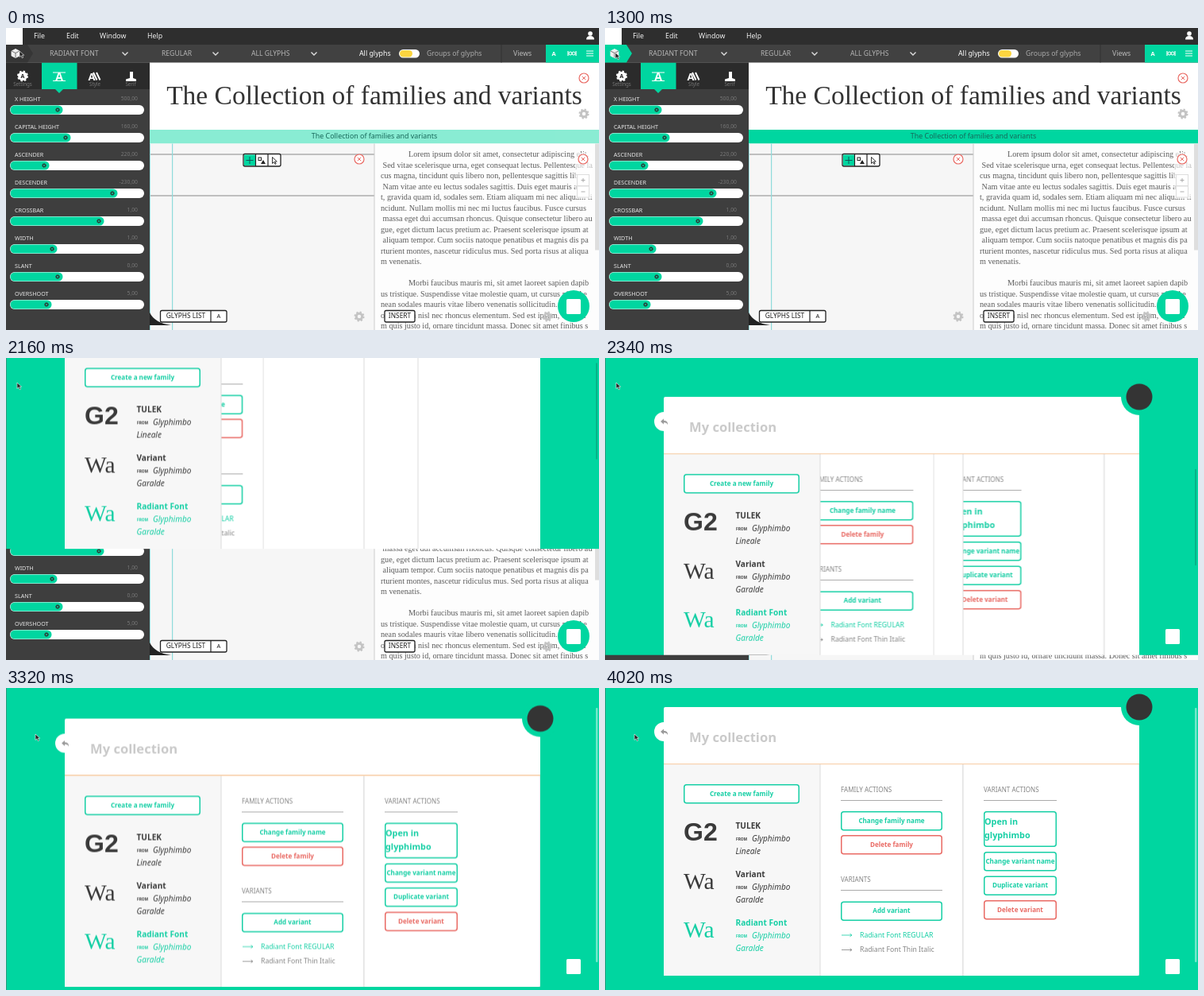
An HTML page for the animation above (4.06 s loop, 747 px wide and 380 px high).

```html
<!DOCTYPE html>
<html lang="en">
<head>
<meta charset="utf-8">
<title>Font editor collection</title>
<style>
html, body { margin: 0; width: 100%; height: 100%; overflow: hidden; background: #fff; }
svg { display: block; width: 747px; height: 380px; font-family: "Noto Sans", "Open Sans", sans-serif; }
text { white-space: pre; }
.serif { font-family: "Liberation Serif", "Noto Serif", serif; }
.grotesk { font-family: "Liberation Sans", sans-serif; }
.hover, .band, .caret, .overlay, .slide2, .slide3, .scroll, .pill, .thumb, .rest, .cursor {
  animation: 4060ms linear infinite;
}
.hover { animation-name: hover; }
.band { animation-name: band; }
.caret { animation-name: caret; }
.overlay { animation-name: drop; }
.slide2 { --from: -185px; animation-name: slide; }
.slide3 { --from: -225px; animation-name: slide; }
.scroll { animation-name: scroll; }
.pill { animation-name: pill; }
.thumb { animation-name: thumb; }
.rest { animation-name: rest; }
.cursor { animation-name: cursor; }
@keyframes hover { 0%, 1.5% { opacity: 0 } 6.4%, 100% { opacity: 1 } }
@keyframes band { 0%, 1.5% { opacity: .46 } 6.4%, 100% { opacity: 1 } }
@keyframes caret { 0%, 34.47% { opacity: 0 } 34.48%, 100% { opacity: 1 } }
@keyframes drop {
  0%, 49.26% { transform: translateY(-400px); animation-timing-function: cubic-bezier(.333, .667, .667, 1) }
  59.06%, 100% { transform: translateY(0) }
}
@keyframes slide {
  0%, 51.23% { transform: translateX(var(--from)); animation-timing-function: cubic-bezier(.333, .667, .667, 1) }
  62.81%, 100% { transform: translateX(0) }
}
@keyframes scroll {
  0%, 77.83% { transform: translateY(57px) }
  80.79% { transform: translateY(43px) }
  83.25% { transform: translateY(32px) }
  85.71%, 88.67% { transform: translateY(28px) }
  89.16% { transform: translateY(26px) }
  92.61% { transform: translateY(25px) }
  98.5%, 100% { transform: translateY(24px) }
}
@keyframes pill { 0%, 68.9% { opacity: 0 } 69%, 77.8% { opacity: 1 } 77.9%, 100% { opacity: 0 } }
@keyframes thumb { 0%, 79.9% { opacity: 0 } 80%, 100% { opacity: 1 } }
@keyframes rest { 0%, 79.9% { opacity: 1 } 80%, 100% { opacity: 0 } }
@keyframes cursor {
  0%, 1% { transform: translate(17px, 29px) }
  6%, 48% { transform: translate(13px, 31px) }
  54%, 68% { transform: translate(14px, 31px) }
  72.9%, 100% { transform: translate(37px, 58px) }
}
</style>
</head>
<body>
<svg id="stage" viewBox="0 0 747 380"></svg>
<script>
const GREEN = '#00d6a0', TEAL = '#16cfa5', RED = '#e96a64', DARK = '#2e2e2e', INK = '#3a3a3a';

const rect = (x, y, w, h, fill, more = '') =>
  `<rect x="${x}" y="${y}" width="${w}" height="${h}" fill="${fill}" ${more}/>`;
const circle = (x, y, r, fill, more = '') => `<circle cx="${x}" cy="${y}" r="${r}" fill="${fill}" ${more}/>`;
const path = (d, stroke, w = 1, fill = 'none') =>
  `<path d="${d}" stroke="${stroke}" stroke-width="${w}" fill="${fill}"/>`;
// cy is the middle of the capitals
const text = (x, cy, s, size, fill, more = '') =>
  `<text x="${x}" y="${(cy + size * .35).toFixed(2)}" font-size="${size}" fill="${fill}" ${more}>${s}</text>`;
const group = (cls, body, more = '') => `<g class="${cls}" ${more}>${body}</g>`;
const MID = 'text-anchor="middle"', BOLD = 'font-weight="700"', MEDIUM = 'font-weight="500"';

const gear = (x, y, r, color) =>
  circle(x, y, r * .62, 'none', `stroke="${color}" stroke-width="${r * .5}"`) +
  circle(x, y, r * .92, 'none', `stroke="${color}" stroke-width="${r * .34}" stroke-dasharray="${r * .361}"`);
const close = (x, y) => circle(x, y, 6, '#fff', `stroke="${RED}" stroke-width="1.2"`) +
  path(`M${x - 2.2} ${y - 2.2}l4.4 4.4m0-4.4l-4.4 4.4`, RED);
const chevron = x => path(`M${x - 3.5} 30.5l3.5 3.5 3.5-3.5`, '#ddd', 1.4);

function topBars() {
  const menu = [[35, 'File'], [76, 'Edit'], [118, 'Window'], [178, 'Help']];
  const picks = [[55, 'RADIANT FONT', 150], [196, 'REGULAR', 264], [309, 'ALL GLYPHS', 388]];
  const tag = 'M0 21H27L34 32 27 43.5H0Z';
  return rect(0, 0, 747, 21, DARK) + rect(0, 0, 21, 21, '#fff') +
    menu.map(([x, s]) => text(x, 9.5, s, 8.8, '#f2f2f2', MEDIUM)).join('') +
    circle(736, 7, 2.8, '#fff') + path('M731 14.5q0-4.5 5-4.5t5 4.5z', 'none', 0, '#fff') +
    rect(0, 21, 747, 22.5, '#414141') + path(tag, 'none', 0, '#363636') +
    group('hover', path(tag, 'none', 0, GREEN)) +
    path('M12 26.5l5 2.5v6l-5 2.5-5-2.5v-6z', '#fff', .8, '#eee') + path('M7 29l5 2.5 5-2.5M12 31.5v6', '#555', .8) +
    picks.map(([x, s, c]) => text(x, 32, s, 8.6, '#b4b4b4') + chevron(c)).join('') +
    text(445, 31.5, 'All glyphs', 8.8, '#fff', MEDIUM) +
    rect(495, 27, 26, 10.5, '#fff', 'rx="5.2"') + rect(496, 28, 16, 8.5, '#fcd53f', 'rx="4.2"') +
    text(530, 31.5, 'Groups of glyphs', 8.7, '#aaa') +
    rect(623.5, 21, 1, 22.5, '#333') + text(639, 32, 'Views', 8.7, '#bbb') +
    rect(680, 21, 67, 22.5, GREEN) + text(687.5, 32, 'A', 7.5, '#fff', BOLD) +
    circle(711, 32, 2, 'none', 'stroke="#fff"') + circle(715, 32, 2, 'none', 'stroke="#fff"') +
    path('M708 29v6M718 29v6M731 29h9M731 32h9M731 35h9', '#fff', 1.2);
}

function sidebar() {
  const sliders = [
    ['X HEIGHT', '500,00', 66], ['CAPITAL HEIGHT', '160,00', 76], ['ASCENDER', '220,00', 49],
    ['DESCENDER', '-230,00', 135], ['CROSSBAR', '1,00', 118], ['WIDTH', '1,00', 59],
    ['SLANT', '0,00', 66], ['OVERSHOOT', '5,00', 52]];
  const tabs = [[21, 'Settings'], [112, 'Style'], [157, 'Serif']];
  return rect(0, 43.5, 181, 337, '#3e3e3e') + rect(0, 43.5, 181, 33.5, '#2b2b2b') +
    tabs.map(([x, s]) => text(x, 71, s, 6.2, '#777', MID)).join('') +
    rect(45, 43.5, 44.5, 33.5, GREEN) + path('M62 77h10l-5 5z', 'none', 0, GREEN) +
    text(67, 61, 'A', 14, '#fff', `${MID} ${BOLD}`) + path('M59 56h16M59 66.5h16', '#fff', 1) +
    circle(21, 60.5, 5.6, '#fff') + gear(21, 60.5, 6.4, '#fff') + text(21, 60.5, 'A', 7, '#222', `${MID} ${BOLD}`) +
    text(108, 61, 'A', 13, '#fff', `${MID} ${BOLD}`) + path('M110 56l4.5 9.5M114 56l4.5 9.5', '#fff', 2) +
    path('M156 55h4v8l4 1.5V67h-13v-2.5l5-1.5z', 'none', 0, '#fff') +
    sliders.map(([name, value, x], i) => {
      const y = 103 + i * 35;
      return text(11, y - 14, name, 7.2, '#e6e6e6', MEDIUM) +
        text(166, y - 14.5, value, 6.8, '#777', 'text-anchor="end"') +
        rect(5, y - 6, 169, 12, '#fff', 'rx="6"') + rect(5.5, y - 5.5, x, 11, GREEN, 'rx="5.5"') +
        gear(x - 1, y, 2.7, '#2c3b38');
    }).join('');
}

function board() {
  const lines = [
    '', ' Sed vitae scelerisque urna, eget consequat lectus. Pellentesque la',
    'cus magna, tincidunt quis libero non, pellentesque sagittis liber',
    ' Nam vitae ante eu lectus sodales sagittis. Duis eget mauris aliqu',
    't, gravida quam id, sodales sem. Etiam aliquam mi nec aliquam ti',
    'ncidunt. Nullam mollis mi nec mi luctus faucibus. Fusce cursus',
    ' massa eget dui accumsan rhoncus. Quisque consectetur libero au',
    'gue, eget dictum lacus pretium ac. Praesent scelerisque ipsum at',
    ' aliquam tempor. Cum sociis natoque penatibus et magnis dis pa',
    'rturient montes, nascetur ridiculus mus. Sed porta risus at aliqua',
    'm venenatis.', '', '',
    'us tristique. Suspendisse vitae molestie quam, ut cursus nisi. Ae',
    'nean sodales mauris vitae libero venenatis sollicitudin. Praes',
    'o interdum nisl nec rhoncus elementum. Sed est ipsum, volutpa',
    'm quis justo id, ornare tincidunt massa. Donec sit amet finibus s'];
  lines[0] = 'Lorem ipsum dolor sit amet, consectetur adipiscing elit.';
  lines[12] = 'Morbi faucibus mauris mi, sit amet laoreet sapien dapib';
  const title = 'The Collection of families and variants';
  const box = (x, y, w, h) => rect(x, y, w, h, '#fff', 'rx="2" stroke="#222" stroke-width="1.3"');
  return rect(181, 43.5, 566, 84.5, '#fff') +
    `<text class="serif" x="464" y="96" font-size="33.5" fill="#333" ${MID}>${title}</text>` +
    close(728, 63) + gear(728, 108, 6, '#c4c4c4') +
    rect(181, 128, 566, 17.5, '#fff') + group('band', rect(181, 128, 566, 17.5, GREEN)) +
    text(464, 136, title, 8.9, '#17685a', MID) + group('caret', rect(543, 131.5, 1, 9, '#155')) +
    rect(181, 145.5, 283, 235, '#f6f6f6') + rect(181, 158.5, 283, 1, '#8a8a8a') + rect(181, 210.5, 283, 1, '#8a8a8a') +
    rect(181, 145.5, 1, 235, '#9adfe0') + rect(209, 145.5, 1.2, 235, '#8fdcdc') +
    path('M181 358Q187 371 208 374H181Z', 'none', 0, '#222') +
    box(299, 158.5, 47, 15.5) + rect(300, 159.5, 14, 13.5, GREEN) + path('M314.5 159v15M330 159v15', '#222', 1.2) +
    path('M307 162v9M302.5 166.5h9', '#155', 1) + rect(318, 163, 3.5, 3.5, 'none', 'stroke="#222"') +
    path('M321 171l3-5 3 5z', 'none', 0, '#222') + path('M335.5 162.5v8l2-2 1.5 3 1.2-.7-1.5-2.8h2.6z', '#222', .9) +
    close(445, 165) + gear(445, 363, 6, '#c4c4c4') +
    box(194.5, 355.5, 83.5, 14.5) + path('M258 355v15', '#222', 1.2) +
    text(226.5, 362.5, 'GLYPHS LIST', 8.4, '#222', MID) + text(268, 362.5, 'A', 7.5, '#222', MID) +
    rect(464, 145.5, 283, 235, '#fdfdfd') + rect(463.5, 145.5, 1, 235, '#ccc') +
    lines.map((s, i) => s && `<text class="serif" x="${i % 12 ? 472 : 507}" y="${162 + i * 13.5}"
      font-size="10.2" fill="#5c5c5c">${s}</text>`).join('') +
    rect(742, 145.5, 5, 134, '#dedede') + rect(717, 157, 21, 58, '#fff', 'opacity=".65"') + close(727, 165) +
    rect(719.5, 184.5, 15, 14, '#fff', 'stroke="#ddd"') + rect(719.5, 199, 15, 14, '#fff', 'stroke="#ddd"') +
    path('M724.5 191.5h5M727 189v5M724.5 206h5', '#aaa') + gear(682, 363, 6, '#c4c4c4') +
    box(477, 355.5, 38, 14.5) + text(496, 362.5, 'INSERT', 8.4, '#222', MID);
}

const button = (x, y, w, h, label, color = TEAL) =>
  rect(x + .75, y + .75, w - 1.5, h - 1.5, '#fff', `rx="3" stroke="${color}" stroke-width="1.5"`) +
  (label ? text(x + w / 2, y + h / 2 - .3, label, 8.1, color, `${MID} ${BOLD}`) : '');
const heading = (x, y, w, s) => text(x, y, s, 8.1, '#858585') + rect(x, y + 13, w, 1, '#aaa');

function family(y, sample, cls, size, name, kind, color) {
  return `<text class="${cls}" x="99" y="${y + 18.5}" font-size="${size}" fill="${color}">${sample}</text>` +
    text(164.5, y, name, 10.1, color, BOLD) + text(165, y + 17, 'FROM', 4.8, color, BOLD) +
    text(185, y + 16, 'Glyphimbo', 10, color, 'font-style="italic"') +
    text(164.5, y + 32, kind, 10, color, 'font-style="italic"');
}

function collection() {
  const variant = (y, s, color) => path(`M298 ${y}h13m-2.5-1.8l2.5 1.8-2.5 1.8`, color, .8) + text(321, y - .5, s, 8.7, color);
  const edge = x => rect(x - .5, 72, 1, 266, '#dcdcdc');
  const actions = heading(297, 104, 128, 'FAMILY ACTIONS') +
    button(297, 131, 128, 24.5, 'Change family name') + button(297, 161, 128, 24.5, 'Delete family', RED) +
    heading(297, 217, 128, 'VARIANTS') + button(297, 244.5, 128, 24.5, 'Add variant') +
    variant(287, 'Radiant Font REGULAR', TEAL) + variant(305.5, 'Radiant Font Thin Italic', '#858585') + edge(451);
  const changes = heading(477, 104, 92, 'VARIANT ACTIONS') + button(477, 131, 92, 45, '') +
    text(478, 144.5, 'Open in', 10.8, TEAL, BOLD) + text(478, 161.5, 'glyphimbo', 10.8, TEAL, BOLD) +
    button(477, 182, 92, 24.5, 'Change variant name') + button(477, 212.5, 92, 24.5, 'Duplicate variant') +
    button(477, 243, 92, 24.5, 'Delete variant', RED) + edge(673);
  return rect(74, 0, 599, 338, '#fff', 'rx="2"') + circle(74, 31, 12, '#fff') +
    path('M72 34.5h3.5q3 0 3 2.6', '#999', 0) + path('M74 27.5l-4 3.5 4 3.5v-2.3q4-.2 5 3 .6-5.3-5-5.5z', 'none', 0, '#999') +
    circle(673, 0, 23, GREEN) + circle(673, 0, 16.5, '#343434') +
    text(106, 38, 'My collection', 16.6, '#cacaca', BOLD) +
    rect(74, 72, 197, 266, '#f7f7f7') +
    button(99, 97, 146, 24.5, 'Create a new family') +
    family(149, 'G2', 'grotesk', '32" font-weight="700', 'TULEK', 'Lineale', INK) +
    family(210, 'Wa', 'serif', 29.5, 'Variant', 'Garalde', INK) +
    family(271.5, 'Wa', 'serif', 29.5, 'Radiant Font', 'Garalde', TEAL) +
    group('', group('slide2', actions), 'clip-path="url(#col2)"') +
    group('', group('slide3', changes), 'clip-path="url(#col3)"') +
    edge(271) + edge(451) + rect(74, 71, 599, 1.2, '#f8d2ae');
}

const clip = (id, x, y, w, h) => `<clipPath id="${id}">${rect(x, y, w, h, '#000')}</clipPath>`;
const overlay = rect(0, 0, 747, 382, GREEN) + rect(0, 0, 1, 382, '#2a9c80') +
  group('scroll', collection()) +
  group('pill', rect(160, 371, 426, 30, '#e4e4e4', 'rx="9" opacity=".75"')) +
  group('rest', rect(743, 148, 2, 121, '#0a9c78', 'opacity=".6"')) +
  group('thumb', rect(743, 25, 2.5, 320, '#fff', 'opacity=".45" rx="1"'));

document.getElementById('stage').innerHTML =
  `<defs>${clip('col2', 271, 72, 180, 266)}${clip('col3', 451, 72, 222, 266)}${clip('sheet', 0, 0, 747, 382)}</defs>` +
  board() + sidebar() + topBars() +
  circle(715, 350, 20, GREEN) +
  group('overlay', overlay, 'clip-path="url(#sheet)"') +
  rect(706, 341, 18, 19, '#fff', 'rx="1.5"') +
  group('cursor', path('M0 0v7.5l1.9-1.7 1.4 3 1.4-.7-1.4-2.9h2.5z', '#fff', .6, '#222'));
</script>
</body>
</html>
```
